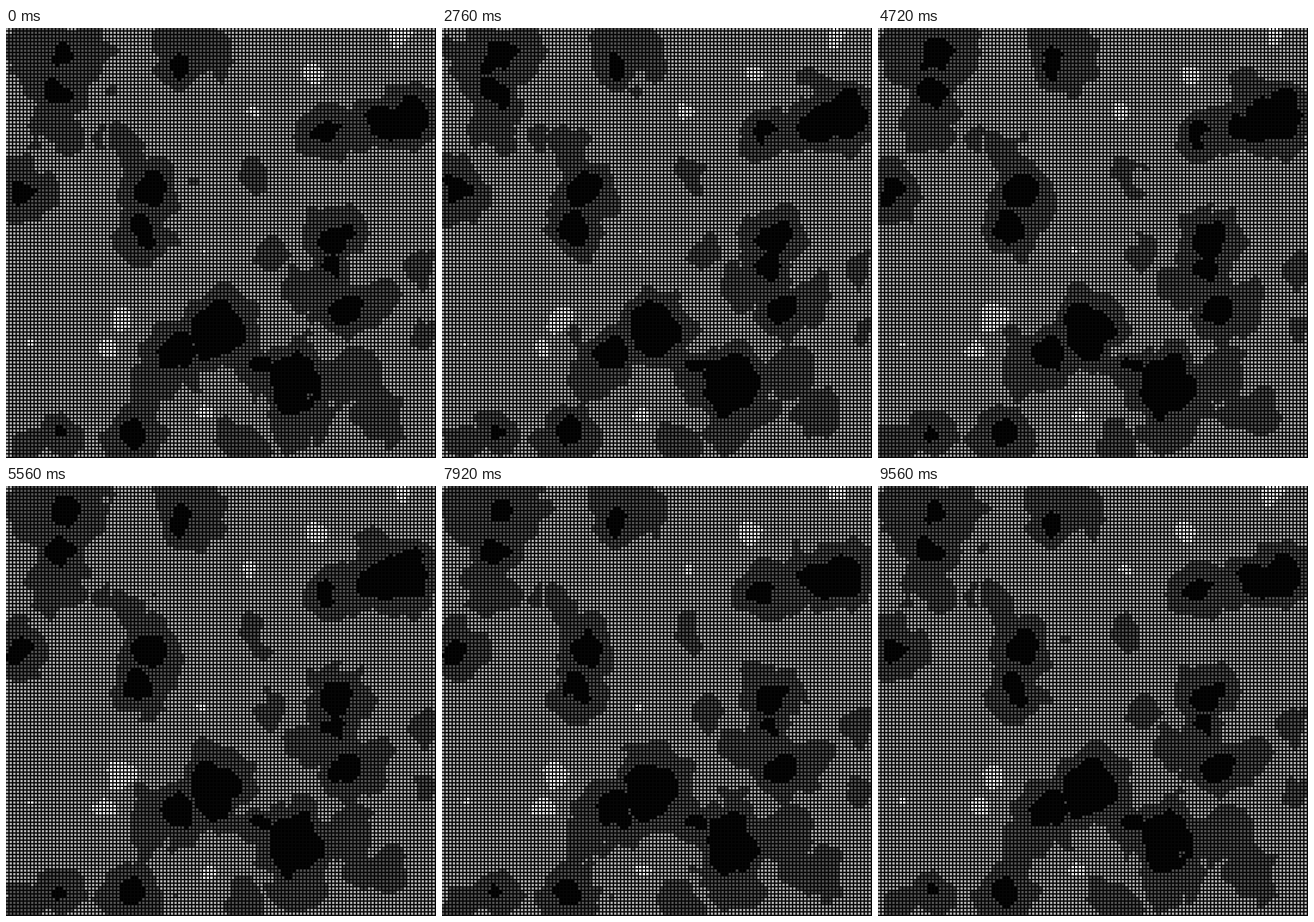
Animation, 720 px wide and 720 px high, one loop 9.6 s. Source, as an HTML page with a canvas:

```html
<!DOCTYPE html>
<html lang="en">
<head>
<meta charset="utf-8">
<title>Drifting tones</title>
<style>
html, body { margin: 0; width: 100%; height: 100%; overflow: hidden; background: #060606; }
canvas { display: block; }
</style>
</head>
<body>
<canvas id="stage" width="720" height="720"></canvas>
<script>
const ctx = document.getElementById('stage').getContext('2d');
const LOOP = 9600, STEP = 40, N = 120, PITCH = 6, DOT = 4, RIM = 28;
const TONES = ['#000', '#4b4b4b', '#a0a0a0', '#fff'];

// Blobs: x, y, radius
const shades = [
  [85, 50, 80], [80, 165, 45], [305, 45, 60], [415, 250, 30], [440, 375, 30],
  [620, 465, 38], [490, 430, 32], [245, 590, 42], [575, 580, 48], [620, 650, 48],
  [400, 700, 36], [700, 410, 28], [490, 675, 36], [40, 700, 30], [210, 205, 32],
  [155, 180, 22], [700, 510, 22]
];
const darks = [
  [95, 40, 25], [88, 110, 24], [25, 272, 22], [290, 62, 15], [622, 155, 33],
  [672, 156, 34], [538, 178, 21], [245, 275, 30], [225, 338, 27], [355, 505, 46],
  [290, 542, 34], [485, 600, 47], [555, 355, 28], [545, 402, 19], [568, 472, 25],
  [215, 678, 24], [95, 680, 15], [425, 565, 17]
];
const glints = [
  [660, 15, 18], [515, 83, 20], [406, 142, 13], [194, 488, 18],
  [170, 537, 13], [340, 647, 11], [42, 528, 8], [328, 376, 6]
];

const hash = (x, y, seed) => {
  let h = Math.imul(x, 374761393) ^ Math.imul(y, 668265263) ^ Math.imul(seed, 974634533);
  h = Math.imul(h ^ h >>> 13, 1274126177);
  return ((h ^ h >>> 16) >>> 0) / 2147483648 - 1;
};
const ease = t => t * t * (3 - 2 * t);
const mix = (a, b, t) => a + (b - a) * t;
function noise(x, y, seed) {
  const i = Math.floor(x), j = Math.floor(y), u = ease(x - i), v = ease(y - j);
  return mix(mix(hash(i, j, seed), hash(i + 1, j, seed), u),
             mix(hash(i, j + 1, seed), hash(i + 1, j + 1, seed), u), v);
}

const layer = () => new Float32Array(N * N);
let seed = 0;
function noiseMap() {
  const a = ++seed, b = ++seed;
  return layer().map((_, k) => {
    const x = k % N, y = k / N | 0;
    return noise(x / 6, y / 6, a) + noise(x / 3, y / 3, b) / 2;
  });
}

// A still pattern plus two more that swing a quarter loop apart
function drift() {
  const [still, p, q] = [noiseMap(), noiseMap(), noiseMap()];
  const out = layer();
  return angle => {
    const c = .7 * Math.cos(angle), s = .7 * Math.sin(angle);
    return out.map((_, k) => still[k] + p[k] * c + q[k] * s);
  };
}
const driftX = drift(), driftY = drift(), driftTone = drift();

// Keeps the largest blob strength per cell; positive means inside
function paint(field, blobs, flow, bend, rough, grow = 0) {
  for (const [x, y, radius] of blobs) {
    const r = radius + grow, reach = r * 1.4 + 20;
    const from = p => Math.max(0, Math.floor((p - reach) / PITCH));
    const to = p => Math.min(N - 1, Math.ceil((p + reach) / PITCH));
    for (let j = from(y); j <= to(y); j++) {
      for (let i = from(x); i <= to(x); i++) {
        const k = j * N + i;
        const dx = i * PITCH + 2 + bend * flow.x[k] - x;
        const dy = j * PITCH + 2 + bend * flow.y[k] - y;
        const v = 1 - (dx * dx + dy * dy) / (r * r) + rough * flow.tone[k];
        field[k] = Math.max(field[k], v);
      }
    }
  }
}

function render(time) {
  const angle = 2 * Math.PI * time;
  const flow = { x: driftX(angle), y: driftY(angle), tone: driftTone(angle) };
  const shade = layer(), dark = layer(), glint = layer();
  paint(shade, shades, flow, 11, .45);
  paint(shade, darks, flow, 11, .35, RIM);
  paint(dark, darks, flow, 9, .45);
  paint(glint, glints, flow, 6, .8);

  const tone = k => shade[k] > 0 ? (dark[k] > 0 ? 0 : 1) : glint[k] > 0 ? 3 : 2;
  const paths = TONES.map(() => new Path2D());
  for (let k = 0; k < N * N; k++)
    paths[tone(k)].rect(k % N * PITCH, (k / N | 0) * PITCH, DOT, DOT);
  ctx.fillStyle = '#060606';
  ctx.fillRect(0, 0, 720, 720);
  paths.forEach((path, i) => {
    ctx.fillStyle = TONES[i];
    ctx.fill(path);
  });
}

const start = performance.now();
let last = -1;
function tick(now) {
  const step = Math.floor(Math.max(0, now - start) % LOOP / STEP);
  if (step !== last) render((last = step) * STEP / LOOP);
  requestAnimationFrame(tick);
}
tick(start);
</script>
</body>
</html>
```
